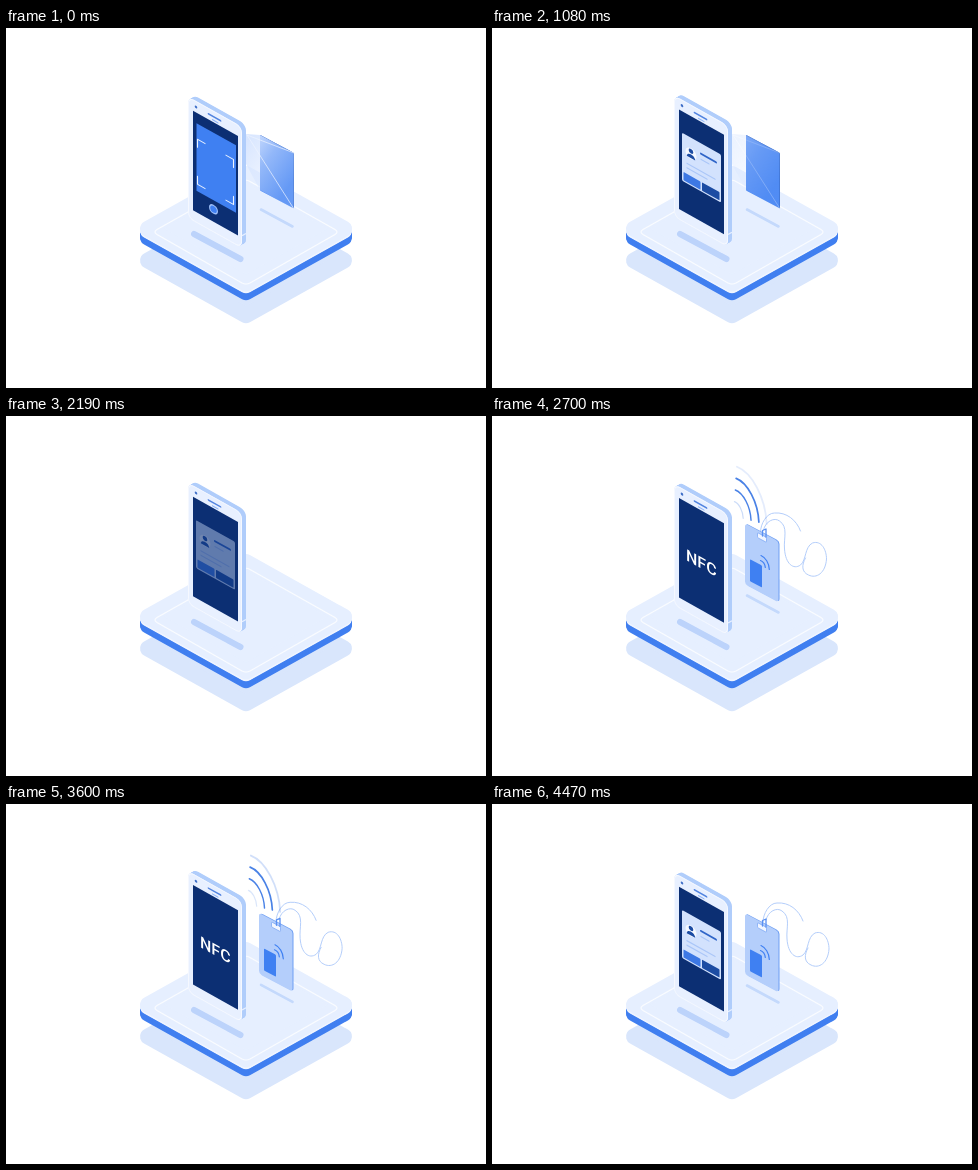
An HTML page for the animation above (4.5 s loop, 480x360 px).

```html
<!DOCTYPE html>
<html lang="en">
<head>
<meta charset="utf-8">
<style>
html, body { margin: 0; width: 100%; height: 100%; overflow: hidden; background: #fff; }
svg { display: block; width: 100vw; height: 100vh; }
text { font: 500 16px Roboto, Arial, sans-serif; fill: #fff; }
.line { fill: none; stroke-linecap: round; stroke-linejoin: round; }
</style>
</head>
<body>
<svg viewBox="0 0 480 360">
  <defs>
    <linearGradient id="ray" gradientUnits="userSpaceOnUse" x1="240" y1="115" x2="289" y2="150">
      <stop offset="0" stop-color="#d7e5ff" stop-opacity=".95"/>
      <stop offset=".45" stop-color="#d7e5ff" stop-opacity=".55"/>
      <stop offset="1" stop-color="#d7e5ff" stop-opacity=".25"/>
    </linearGradient>
  </defs>
  <g id="base"></g>
  <path class="line" d="M188 206L234.5 231" stroke="#bcd3fb" stroke-width="6"/>

  <g id="card">
    <path class="line" d="M255 181.500L286.500 198.500" stroke="#c4d9fc" stroke-width="2.600"/>
    <g transform="matrix(1 .53 0 1 254 107)">
      <rect width="34" height="55.500" rx="1" fill="#3f80f2"/>
      <path class="line" d="M.5 .3H33.500V55" stroke="#2c65cc" stroke-width=".7"/>
    </g>
  </g>

  <g id="badge">
    <path class="line" d="M255 179.500L286.500 196.500" stroke="#c4d9fc" stroke-width="2.600"/>
    <g id="cord" class="line" stroke="#b4cefb" stroke-width="1">
      <path d="M271 116C271 108 277 97 285 97C297 96 307 104 311 115"/>
      <path d="M274 114C276 105 285 101 290 105C299 111 294 122 295 133C296 148 304 154 311 149C317 144 315 131 323 127C332 124 337 134 337 143C336 157 327 163 319 159C312 156 312 149 316 142"/>
    </g>
    <g transform="matrix(1 .53 0 1 253 109)">
      <rect x="1" y="-2.200" width="33.500" height="61" rx="3" fill="#6f9ff3"/>
      <rect y="-1.500" width="33.500" height="61" rx="3" fill="#b4cefb"/>
      <rect x="5" y="31.500" width="12" height="22" rx="1" fill="#3f80f2"/>
      <rect x="12.500" y="1" width="9" height="5" rx="1" fill="#f2f6ff" stroke="#6f9ff3" stroke-width=".6"/>
    </g>
    <path class="line" d="M270.500 120V114.500L274 113V121" stroke="#5a90f1" stroke-width="1.300"/>
    <path class="line" d="M269 139.500C273.500 141.500 277 147 277.300 153.500M268.500 144.500C271 145.500 273 148 273.300 151.500" stroke="#3f80f2" stroke-width="1.200"/>
  </g>

  <g id="beam">
    <path d="M240 106L254 107L288 125V181L254 162L240 136Z" fill="url(#ray)"/>
    <path id="edge" class="line" stroke="#eef4ff" stroke-width=".7"/>
  </g>
  <g id="waves" class="line" stroke="#4a82e6"></g>

  <g id="phone">
    <g transform="matrix(1 .56 0 1 182 70)">
      <g id="shell"></g>
      <rect y="-2.500" width="54" height="121.500" rx="6" fill="#e8f0ff"/>
      <rect x=".5" y="-2" width="53" height="120.500" rx="5.500" fill="none" stroke="#f8faff" stroke-width=".8"/>
      <path d="M54 106.500L58 102" stroke="#e8f0ff" stroke-width="1"/>
      <circle cx="8" cy="3.500" r="1.300" fill="#3f6fc8"/>
      <path class="line" d="M20.500 3.500H32.500" stroke="#5284e0" stroke-width="1.700"/>
      <path class="line" d="M24.500 7H30" stroke="#8db3f6" stroke-width="1.200"/>
      <rect x="5" y="9" width="45" height="99.500" fill="#0c2f73"/>
      <g id="scan">
        <rect x="8.500" y="19.500" width="39.500" height="67.500" fill="#3f80f2"/>
        <path class="line" d="M9.500 43V35H17M38 35H45.500V43M9.500 72V80H17M38 80H45.500V72" stroke="#eef4ff" stroke-width="1.100"/>
        <circle cx="25.500" cy="96" r="4.500" fill="#9dbff9"/>
        <circle cx="25.500" cy="96" r="3.300" fill="#3f80f2"/>
      </g>
      <text id="label" x="27.300" y="67" text-anchor="middle">NFC</text>
      <g id="pop">
        <rect x="8" y="30.500" width="39" height="48" rx="1.500" fill="#d3e2fd"/>
        <circle cx="17" cy="46.500" r="5.500" fill="#f6f9ff"/>
        <circle cx="17" cy="44" r="2.300" fill="#1c4ca3"/>
        <path d="M12.800 51C13 46 21 46 21.200 51Z" fill="#1c4ca3"/>
        <path class="line" d="M27 41H42" stroke="#2f65c8" stroke-width="2"/>
        <path class="line" d="M27 46.500H35" stroke="#aac6f8" stroke-width="1.200"/>
        <path class="line" d="M13 58.500H41M13 63H33" stroke="#aac6f8" stroke-width="1.300"/>
        <rect x="9.500" y="69" width="17" height="8.200" rx=".6" fill="#3d78e4"/>
        <rect x="28" y="69" width="17.500" height="8.200" rx=".6" fill="#1c4ca3"/>
      </g>
    </g>
  </g>
</svg>
<script>
const LOOP = 4500;
const $ = id => document.getElementById(id);
const clamp = x => Math.max(0, Math.min(1, x));
const ramp = (t, a, b) => clamp((t - a) / (b - a));
const smooth = x => x * x * (3 - 2 * x);
const fade = (t, a, b) => smooth(ramp(t, a, b));
const show = (id, a) => $(id).setAttribute('opacity', a.toFixed(3));
const move = (id, x, y) => $(id).setAttribute('transform', `translate(${x} ${y})`);

function add(parent, tag, attrs) {
  const el = document.createElementNS('http://www.w3.org/2000/svg', tag);
  for (const k in attrs) el.setAttribute(k, attrs[k]);
  return $(parent).appendChild(el);
}

// Isometric tile with round corners
function tile(y, color) {
  add('base', 'path', {
    d: `M240 ${y - 54.7}L338 ${y}L240 ${y + 54.7}L142 ${y}Z`,
    fill: color, stroke: color, 'stroke-width': 16, 'stroke-linejoin': 'round'
  });
}

tile(232.5, '#d9e6fc');
for (let y = 209.5; y >= 204; y--) tile(y, '#407ff0');
for (let y = 202.5; y >= 201.5; y -= 0.5) tile(y, '#f0f5ff');
tile(200.8, '#e6efff');
add('base', 'path', {
  d: 'M236 153.500Q240 151 244 153.500L329 201.500Q333 204 329 206.500L244 255Q240 257 236 255L151 206.500Q147 204 151 201.500Z',
  fill: 'none', stroke: '#fafcff', 'stroke-width': 1.2
});

for (let i = 8; i > 0; i--) {
  add('shell', 'rect', {
    x: i / 2, y: -2.5 - i * 0.57, width: 54, height: 121.5, rx: 6, fill: '#b0cdfb'
  });
}

const arcs = Array.from({ length: 4 }, () => add('waves', 'path', {}));

function drawWaves(t) {
  const level = fade(t, 2400, 2600) * (1 - fade(t, 4180, 4420));
  const step = 0.27;
  const phase = (((t - 3150) * 0.00088 + 0.19) % step + step) % step;
  const low = 0.27 + 0.22 * fade(t, 3700, 4000);
  arcs.forEach((arc, i) => {
    const s = 0.27 + phase + i * step;
    const x = v => (241.5 + v * s).toFixed(2);
    const y = v => (100 + v * s).toFixed(2);
    arc.setAttribute('d', `M${x(3)} ${y(-43)}C${x(16)} ${y(-38)} ${x(28)} ${y(-16)} ${x(29)} ${y(7)}`);
    arc.setAttribute('stroke-width', 0.9 + 0.9 * clamp(s));
    arc.setAttribute('opacity', level * ramp(s, low, low + 0.23) * (1 - ramp(s, 1, 1.17)));
  });
}

function popup(t) {
  const late = t > 3000;
  const p = late ? fade(t, 3870, 4140) : fade(t, 300, 520);
  const k = 0.8 + 0.2 * p;
  show('pop', late ? fade(t, 3840, 3960) : p * (1 - fade(t, 2070, 2290)));
  $('pop').setAttribute('transform', `translate(27.5 54.5) scale(${k}) translate(-27.5 -54.5)`);
}

function draw(t) {
  const bob = Math.cos((t - 30) / 1500 * 2 * Math.PI);
  move('phone', 0, bob);

  const out = 45 * ramp(t, 1400, 2050) ** 2;
  move('card', out, out * 0.57);
  show('card', 1 - fade(t, 1750, 2050));

  const rest = 20 * (1 - ramp(t, 2300, 2720)) ** 3;
  const drift = fade(t, 3150, 3900);
  move('badge', rest, rest * 0.57 + 2 * drift);
  show('badge', fade(t, 2300, 2600));
  move('cord', 2.5 * (drift - 1), 0);

  const low = 178 + 3 * Math.cos(t / 1000 * 2 * Math.PI);
  $('edge').setAttribute('d', `M241 107L288 ${low}M241 107L288 125`);
  show('beam', 1 - fade(t, 900, 1250));

  show('scan', 1 - fade(t, 250, 430));
  show('label', fade(t, 2300, 2500) * (1 - fade(t, 3720, 3860)));
  popup(t);
  drawWaves(t);
}

const start = performance.now();
function tick() {
  draw((performance.now() - start) % LOOP);
  requestAnimationFrame(tick);
}
draw(0);
requestAnimationFrame(tick);
</script>
</body>
</html>
```
